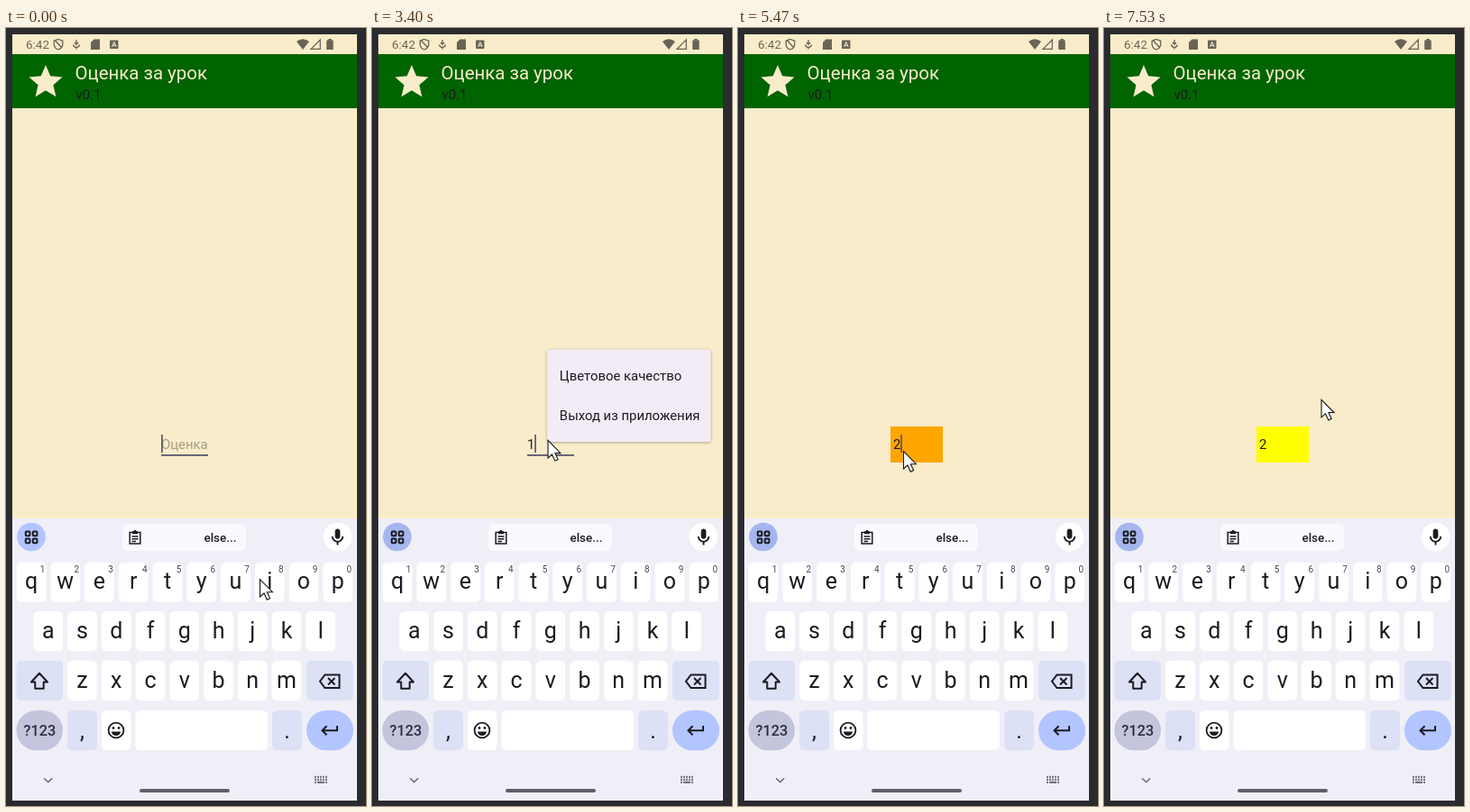
Recreate the animation shown at these times as an HTML page. Size 399x863 px, loop 8 s.

```html
<!DOCTYPE html>
<html lang="ru">
<head>
<meta charset="utf-8">
<title>Оценка за урок</title>
<style>
  html, body { margin: 0; width: 100%; height: 100%; overflow: hidden; background: #2a2b2f; }
  svg { display: block; }
  text { font-family: Roboto, sans-serif; }
  .body { font-size: 14.9px; fill: #1d1b20; }
  .key { font-size: 25px; fill: #1b1b21; text-anchor: middle; }
  .alt { font-size: 10px; fill: #46464f; text-anchor: middle; }
  .line { fill: none; stroke: #1b1b21; stroke-width: 2; }
</style>
</head>
<body>
<svg id="stage" width="100%" height="100%" viewBox="0 0 399 863">
  <defs>
    <filter id="soft" x="-20%" y="-20%" width="140%" height="140%"><feGaussianBlur stdDeviation="1.7"/></filter>
  </defs>
  <rect width="399" height="863" fill="#2a2b2f"/>
  <rect x="7" y="7" width="382" height="850" fill="#f9ecca"/>

  <!-- status bar -->
  <g fill="#6a6458">
    <text x="22" y="22.700" font-size="13.500">6:42</text>
    <path d="M58 12.500l4.800 1.800v3.400c0 3-2 5.200-4.800 6.300-2.800-1.100-4.800-3.300-4.800-6.300v-3.400zM54.500 14l7.500 8" fill="none" stroke="#6a6458" stroke-width="1.300"/>
    <path d="M78 13v5m-2-2 2 2.300 2-2.300M74.500 18.500c.5 2 1.800 3 3.500 3s3-1 3.500-3M78 21v2.500" fill="none" stroke="#6a6458" stroke-width="1.300"/>
    <path d="M97.500 12.500h6.500v11.500h-10v-8z"/>
    <rect x="115" y="13.500" width="9.500" height="9.500" rx="1"/>
    <path d="M117.500 21l2.300-5.500 2.300 5.500M118.300 19.300h3" fill="none" stroke="#f9ecca" stroke-width="1"/>
    <path d="M322 15q7-5.500 14 0l-7 9z"/>
    <path d="M348.300 13v10.400h-10.300z" fill="none" stroke="#6a6458" stroke-width="1.300"/>
    <path d="M357.300 12h3.400v1.500h2v10.500h-7.500v-10.500h2.100z"/>
  </g>

  <!-- app bar -->
  <rect x="7" y="29" width="382" height="60" fill="#006400"/>
  <path transform="translate(21.800 37.300) scale(1.850)" fill="#f9ecca" d="M12 17.270 18.180 21l-1.640-7.030L22 9.240l-7.190-.61L12 2 9.190 8.630 2 9.240l5.460 4.730L5.820 21z"/>
  <text x="76.500" y="57" font-size="20.450" fill="#f9ecca">Оценка за урок</text>
  <text class="body" x="77.500" y="79">v0.1</text>

  <!-- field -->
  <rect id="fill" x="169" y="442" width="58" height="40"/>
  <rect id="under" x="172" y="473" width="52" height="1.800" fill="#5b566e"/>
  <text id="value" class="body" x="172" y="467.300"></text>
  <rect id="caret" y="451" width="1.700" height="20" fill="#5b566e"/>

  <!-- keyboard -->
  <rect x="7" y="544" width="382" height="313" fill="#f0eff7"/>
  <circle id="tools" cx="28" cy="564.500" r="15.800"/>
  <g class="line" stroke-width="1.600">
    <rect x="21.800" y="558.500" width="4.700" height="4.700" rx="1"/>
    <rect x="29.800" y="558.500" width="4.700" height="4.700" rx="1"/>
    <rect x="21.800" y="566.500" width="4.700" height="4.700" rx="1"/>
    <rect x="29.800" y="566.500" width="4.700" height="4.700" rx="1"/>
  </g>
  <rect x="129" y="550" width="137" height="30" rx="6" fill="#f9f9fe"/>
  <path class="line" style="stroke-width:1.500" d="M137.200 559.500h11.600v12.500h-11.600zM139.500 564h7m-7 2.700h7m-7 2.700h4.500"/>
  <path d="M140 558.300h1.300a1.800 1.800 0 0 1 3.400 0h1.300v3h-6z" fill="#1b1b21"/>
  <text x="219.500" y="569.600" font-size="13.400" font-weight="500" fill="#1b1b21">else...</text>
  <circle cx="367.500" cy="564.500" r="15.800" fill="#fff"/>
  <path transform="translate(356.100 553.500) scale(.95)" fill="#1b1b21" d="M12 14c1.660 0 3-1.340 3-3V5c0-1.660-1.340-3-3-3S9 3.340 9 5v6c0 1.660 1.340 3 3 3zM17 11c0 2.760-2.240 5-5 5s-5-2.240-5-5H5c0 3.530 2.610 6.430 6 6.920V21h2v-3.080c3.390-.49 6-3.390 6-6.920z"/>
  <g id="keys"></g>
  <path class="line" d="M37 715.700l9 9.800h-4.300v7.200h-9.400v-7.200h-4.300z" stroke-linejoin="round"/>
  <path class="line" d="M353.500 717.500h16v14.500h-16l-5.500-7.250zM357 721l7.500 7.500m0-7.500-7.500 7.500"/>
  <circle class="line" cx="122" cy="779" r="8.400" style="stroke-width:1.800"/>
  <path d="M117 780.500h10a5 4.600 0 0 1-10 0z" fill="#1b1b21"/>
  <circle cx="119" cy="776.500" r="1.400" fill="#1b1b21"/><circle cx="125" cy="776.500" r="1.400" fill="#1b1b21"/>
  <path class="line" d="M367 774v5.300h-16.500m5-5-5 5 5 5"/>
  <path d="M42.200 832.300l4.500 4.300 4.500-4.300" fill="none" stroke="#66666d" stroke-width="1.400"/>
  <path d="M342 830.800h14M342 833.800h14" stroke="#66666d" stroke-width="1.900" stroke-dasharray="1.900 1.100"/>
  <path d="M342 836.800h14" stroke="#66666d" stroke-width="1.900" stroke-dasharray="1.900 1.100 8 1.100"/>
  <rect x="148" y="844" width="100" height="4" rx="2" fill="#5f5f66"/>

  <!-- popup menu -->
  <g id="menu">
    <rect id="shade" rx="2" filter="url(#soft)"/>
    <svg id="pane" overflow="hidden">
      <rect width="100%" height="100%" rx="1.500" fill="#f3ecf6"/>
      <g id="items">
        <rect id="press" y="7.500" width="182" height="44.500" fill="#1d1b20"/>
        <text class="body" x="14" y="35">Цветовое качество</text>
        <text class="body" x="14" y="79.500">Выход из приложения</text>
      </g>
    </svg>
  </g>

  <path id="mouse" d="M.5.5v19.500l4.500-4 3.300 7.200 3.300-1.500-3.200-7h6z" fill="#fff" stroke="#15151a" stroke-width="1.100"/>
</svg>
<script>
const $ = id => document.getElementById(id);
const set = (id, attrs) => { for (const k in attrs) $(id).setAttribute(k, attrs[k]); };
const clamp = v => Math.max(0, Math.min(1, v));
const mix = (a, b, k) => a + (b - a) * k;

const LOOP = 8000, STEP = 1000 / 15;
const MENU_W = 182, MENU_H = 104;

function buildKeys() {
  const out = [];
  const key = (x, y, w, fill = '#fff', r = 5.5) =>
    out.push(`<rect x="${x}" y="${y}" width="${w}" height="44.3" rx="${r}" fill="${fill}"/>`);
  const label = (x, y, s, cls = 'key') => out.push(`<text class="${cls}" x="${x}" y="${y}">${s}</text>`);
  const row = (letters, x0, y) => [...letters].forEach((c, i) => {
    const x = x0 + i * 37.75;
    key(x - 16.3, y, 32.6);
    label(x, y + 29.7, c);
    if (y < 600) label(x + 12.6, y + 11.4, (i + 1) % 10, 'alt');
  });
  row('qwertyuiop', 28, 592.7);
  row('asdfghjkl', 46.8, 647);
  row('zxcvbnm', 84.5, 701.8);
  key(11.5, 701.8, 51.5, '#dde1f6');
  key(333, 701.8, 52, '#dde1f6');
  key(11.5, 757, 51.5, '#c2c5dc', 22);
  key(68, 757, 33, '#dde1f6');
  key(106, 757, 32.5);
  key(143.5, 757, 146.5);
  key(295, 757, 33, '#dde1f6');
  key(333, 757, 52, '#b2c5ff', 22);
  label(84.5, 787.5, ',');
  label(311.5, 787.5, '.');
  out.push('<text x="37.300" y="784.800" font-size="16.300" font-weight="500" text-anchor="middle" fill="#2c2f42">?123</text>');
  $('keys').innerHTML = out.join('');
}

// time, x, y of the pointer tip
const path = [
  [0, 281, 611], [67, 281, 611], [330, 252, 490], [550, 216, 424], [800, 185, 452],
  [867, 185, 452], [1000, 197, 466], [1400, 197, 466], [1533, 199, 468], [1600, 199, 466],
  [2533, 199, 466], [2667, 194.5, 457], [3400, 194.5, 457], [3700, 222, 420], [4000, 246, 392],
  [4333, 246, 392], [4533, 223, 420], [4800, 183, 469], [6267, 183, 469],
  [6550, 216, 428], [6867, 245, 399], [7267, 245, 399], [7533, 239, 416], [LOOP, 239, 416]
];

function pointer(t) {
  const i = Math.max(1, path.findIndex(p => p[0] >= t));
  const [t0, x0, y0] = path[i - 1], [t1, x1, y1] = path[i];
  const k = clamp((t - t0) / (t1 - t0));
  return [mix(x0, x1, k), mix(y0, y1, k)];
}

// the caret flips at each of these times
const blinks = [330, 790, 1325, 1795, 1995, 2660, 3125, 4795, 5260, 5925];
const caretOn = t => t >= 1995 && t < 2660 || blinks.filter(b => b <= t && b !== 1995).length % 2 === 0;

const menus = [
  { open: 3215, close: 4330, x: 194, y: 355, ex: 194, ey: 458 },
  { open: 6185, close: 7265, x: 182, y: 368, ex: 183, ey: 470 }
];

function drawMenu(t) {
  const m = menus.find(m => t > m.open && t < m.close + 130);
  $('menu').style.display = m ? '' : 'none';
  if (!m) return;
  const u = clamp((t - m.open) / 200);
  const kx = 1 - (1 - u) ** 2.5, ky = 1 - (1 - u) ** 1.6;
  const cx = mix(m.ex, m.x + MENU_W / 2, kx), cy = mix(m.ey, m.y + MENU_H / 2, ky);
  const w = MENU_W * mix(.12, 1, kx), h = MENU_H * mix(.15, 1, ky);
  const box = { x: cx - w / 2, y: cy - h / 2, width: w, height: h };
  set('pane', box);
  set('shade', { ...box, y: box.y + 1, 'fill-opacity': .35 * u * u });
  set('items', { transform: `translate(${(w - MENU_W) / 2} ${(h - MENU_H) / 2 + 4 * (1 - ky)})` });
  set('press', { 'fill-opacity': .1 * clamp((t - m.close + 90) / 60) });
  set('menu', { opacity: clamp(u * 2.3) * (1 - clamp((t - m.close) / 130)) });
}

function draw(time) {
  const t = Math.floor((time % LOOP + .5) / STEP) * STEP + .5;
  const text = t < 1995 ? '' : t < 5260 ? '1' : t < 5460 ? '' : '2';
  const color = t < 4395 ? 'none' : t < 7330 ? '#ffa500' : '#ffff00';
  $('value').textContent = text || 'Оценка';
  set('value', { 'fill-opacity': text ? 1 : .38 });
  set('fill', { fill: color });
  set('under', { opacity: color === 'none' ? 1 : 0 });
  set('caret', { x: text ? 180.2 : 172, opacity: caretOn(t) ? 1 : 0 });
  const k = clamp((t - 1995) / 270);
  set('tools', { fill: `rgb(${mix(178, 165, k)},${mix(197, 182, k)},${mix(255, 238, k)})` });
  drawMenu(t);
  set('mouse', { transform: `translate(${pointer(t)})` });
}

buildKeys();
const start = performance.now();
(function tick() {
  draw(performance.now() - start);
  requestAnimationFrame(tick);
})();
</script>
</body>
</html>
```
